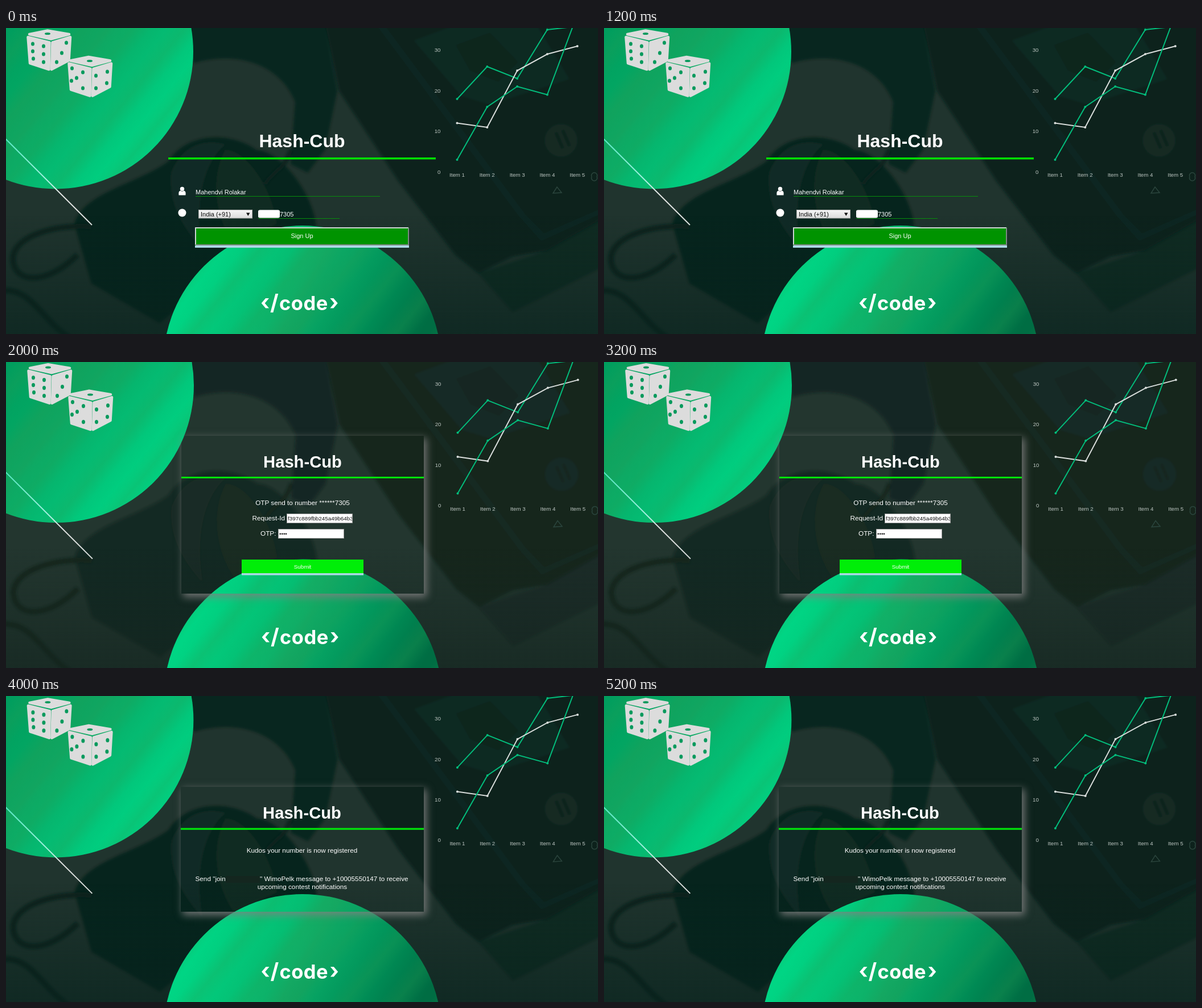
Animation, 1040 px wide and 539 px high, one loop 6000 ms. Source, as an HTML page:

```html
<!DOCTYPE html>
<html lang="en">
<head>
<meta charset="utf-8">
<title>Sign-up flow</title>
<style>
  html, body { margin: 0; width: 100%; height: 100%; overflow: hidden; background: #08231d; }
  svg, section { position: absolute; left: 0; top: 0; width: 1040px; height: 539px; }
  text { font-family: "Liberation Sans", Arial, sans-serif; fill: #fff; white-space: pre; }
  section { visibility: hidden; font-size: 11px; }
  section.small { font-size: 11.75px; }
  .mid { text-anchor: middle; }
  .title { font-size: 32px; font-weight: bold; text-anchor: middle; }
  .small .title { font-size: 29.2px; }
  .ink { fill: #111; }
  .field { font-size: 9.9px; }
  .panel { position: absolute; box-shadow: 4px 5px 13px 1px rgba(128, 128, 128, .85); }
  .code text { font-family: Inter, "Open Sans", sans-serif; font-weight: 700; }
  .axis { font-size: 9.7px; }
  .axis text { fill: #bcc5c1; }
  #backdrop { --dark: #07231d; --light: #20342e; }
  #backdrop.dim { --dark: #13251f; --light: #23362f; }
  .dark { fill: var(--dark); }
  .light { fill: var(--light); }
  .cable { fill: none; stroke: var(--dark); }
  #shade stop { stop-color: var(--dark); }
</style>
</head>
<body>
<svg id="backdrop">
  <defs>
    <linearGradient id="topGreen" gradientUnits="userSpaceOnUse" x1="-20" y1="-10" x2="230" y2="195">
      <stop offset="0" stop-color="#009a5c"/><stop offset=".3" stop-color="#02a562"/>
      <stop offset=".5" stop-color="#12a560"/><stop offset=".58" stop-color="#08ae68"/>
      <stop offset=".78" stop-color="#04bd74"/><stop offset="1" stop-color="#00d081"/>
    </linearGradient>
    <linearGradient id="lowGreen" gradientUnits="userSpaceOnUse" x1="350" y1="425" x2="680" y2="620">
      <stop offset="0" stop-color="#00d584"/><stop offset=".3" stop-color="#05bd72"/>
      <stop offset=".44" stop-color="#14a862"/><stop offset=".54" stop-color="#07a564"/>
      <stop offset=".75" stop-color="#008f57"/><stop offset="1" stop-color="#006d43"/>
    </linearGradient>
    <linearGradient id="stripes" gradientUnits="userSpaceOnUse" x1="0" y1="0" x2="27" y2="22" spreadMethod="reflect">
      <stop offset=".3" stop-color="#2a9a50" stop-opacity="0"/><stop offset="1" stop-color="#2a9a50" stop-opacity=".22"/>
    </linearGradient>
    <linearGradient id="streak" gradientUnits="userSpaceOnUse" x1="0" y1="196" x2="151" y2="347">
      <stop offset="0" stop-color="#58e8c4"/><stop offset=".5" stop-color="#a8f2e2"/>
      <stop offset=".62" stop-color="#e4e6e5"/><stop offset="1" stop-color="#d8dddb"/>
    </linearGradient>
    <linearGradient id="select" x2="0" y2="1">
      <stop stop-color="#f6f6f6"/><stop offset="1" stop-color="#dcdcdc"/>
    </linearGradient>
    <linearGradient id="shade" x2="0" y2="1">
      <stop stop-opacity="0"/><stop offset="1" stop-opacity=".65"/>
    </linearGradient>
    <filter id="soft" x="-5%" y="-5%" width="110%" height="110%"><feGaussianBlur stdDeviation="2"/></filter>
    <g id="die" fill="#dcdcdc" stroke="#dcdcdc" stroke-width="4.500" stroke-linejoin="round">
      <path d="M41 11 73 4.500 111 11 79 19.500Z"/>
      <path d="M38.500 16 76.500 25.500 75.500 73 42 62Z"/>
      <path d="M81.500 25.500 113 16 110.500 57 80 73Z"/>
    </g>
  </defs>

  <g id="scenery">
    <rect class="light" x="-9" y="-9" width="1060" height="560"/>
    <g filter="url(#soft)">
      <path class="dark" opacity=".75" d="M300-9H560L582 110 560 215 530 255 500 240 508 130C480 60 400 40 330 62Z"/>
      <path class="dark" opacity=".8" d="M120 345C135 290 230 275 285 235 320 180 400 185 440 215
        C480 215 540 290 545 350L550 400 330 470 270 520 150 450Z"/>
      <path class="light" opacity=".35" d="M290 255C310 205 350 195 385 205 350 235 330 300 345 390 310 350 285 310 290 255Z"/>
      <path class="light" opacity=".25" d="M385 215C425 215 470 290 475 345L400 380C365 330 360 260 385 215Z"/>
      <path class="dark" d="M560-9H1050V335L950 392 890 402 830 432 790 400 690 270 585 110Z"/>
      <path class="dark" opacity=".5" d="M830 432 950 392 1050 335V420L890 500Z"/>
      <path class="light" opacity=".3" d="M648-9 900 330 940 375 1050 325V316L945 362 912 328 662-9Z"/>
      <path class="light" opacity=".4" d="M716 22 800-9H930L990 90 850 135 800 120Z"/>
      <path class="dark" opacity=".6" d="M790 30 850 8 900 60 865 95 815 75Z"/>
      <circle class="light" opacity=".45" cx="975" cy="198" r="29"/>
      <path class="cable" stroke-width="5" d="M966 184 978 212M978 180 990 208"/>
      <path class="cable" stroke-width="9" d="M150 350C90 345 15 365 12 405 12 450 70 455 125 400M-5 462C45 460 60 510 110 545"/>
      <path class="cable" stroke-width="7" d="M500 215C490 250 470 250 455 275"/>
    </g>
    <rect x="-9" y="330" width="1060" height="220" fill="url(#shade)"/>
    <path fill="none" stroke="#2b453d" stroke-width="1.500" d="M961 291 968 280 976 290ZM1029 262a5 5 0 1 0 9 0 5 5 0 1 0-9 0"/>

    <g id="discs"></g>
    <path d="M-2 194 151 347" stroke="url(#streak)" stroke-width="2"/>

    <use href="#die"/>
    <use href="#die" x="72" y="46.500"/>
    <g id="pips" fill="#089a5d"></g>

    <g id="chart" fill="none" stroke-width="2"></g>
    <g id="axis" class="axis"></g>

    <g class="code">
      <text x="447" y="496" font-size="38">‹</text>
      <text x="464" y="497" font-size="38">/</text>
      <text x="480" y="497" font-size="34.500" letter-spacing=".5">code</text>
      <text x="568" y="496" font-size="38">›</text>
    </g>
  </g>
</svg>

<section>
  <svg>
    <text class="title" x="520" y="209.500">Hash-Cub</text>
    <rect x="285" y="228" width="470" height="3.500" fill="#00e000"/>
    <circle cx="309.500" cy="283.500" r="3.700" fill="#fff"/>
    <path d="M303.500 294.500Q302.500 287 306.500 286.500 309.500 289 312.500 286.500 316.500 287 315.500 294.500Z" fill="#fff"/>
    <text x="333" y="293">Mahendvi Rolakar</text>
    <path d="M333 296.500H657M443 335.500H586" stroke="#078c0c"/>
    <circle cx="309.500" cy="325.500" r="7" fill="#fff"/>
    <rect x="338.500" y="320.500" width="94" height="14.500" fill="url(#select)" stroke="#a9a9a9"/>
    <text class="ink" x="342" y="331.500">India (+91)</text>
    <path d="M422 325.500H428.500L425.250 331Z" fill="#111"/>
    <rect x="443" y="320.500" width="38" height="14" rx="3" fill="#fff"/>
    <text x="481" y="331.500">7305</text>
    <rect x="332" y="383" width="376" height="4" fill="#add8e6"/>
    <rect x="332" y="351" width="376" height="32" fill="#009300"/>
    <path d="M333 382V352H707" fill="none" stroke="#ccd6d2" stroke-width="2"/>
    <path d="M333 382H707V352" fill="none" stroke="#7d8a84" stroke-width="2"/>
    <text class="mid" x="520" y="370">Sign Up</text>
  </svg>
</section>

<section class="small">
  <div class="panel" style="left:308px;top:129.500px;width:426px;height:278.500px"></div>
  <svg>
    <text class="title" x="521" y="185.500">Hash-Cub</text>
    <rect x="308" y="202" width="426" height="3" fill="#00e60a"/>
    <text class="mid" x="521" y="252">OTP send to number ******7305</text>
    <text x="432.500" y="279">Request-Id</text>
    <text x="447" y="306">OTP:</text>
    <g fill="#fff" stroke="#9a9a9a">
      <rect x="493.500" y="267.500" width="115" height="16"/>
      <rect x="478.500" y="294.500" width="115" height="16"/>
    </g>
    <clipPath id="idClip"><rect x="494" y="267" width="114" height="17"/></clipPath>
    <text class="ink field" x="495" y="279" clip-path="url(#idClip)">f397c889fbb245a49b64b3</text>
    <text class="ink field" x="480" y="306">••••</text>
    <rect x="414" y="348" width="214" height="27.500" fill="#add8e6"/>
    <rect x="414" y="348" width="214" height="24" fill="#00ee08"/>
    <text class="mid field" x="521" y="363.500">Submit</text>
  </svg>
</section>

<section class="small">
  <div class="panel" style="left:307px;top:160px;width:427px;height:219.500px"></div>
  <svg>
    <text class="title" x="520" y="216">Hash-Cub</text>
    <rect x="307" y="232.500" width="427" height="3.200" fill="#00e60a"/>
    <text class="mid" x="520" y="275.500">Kudos your number is now registered</text>
    <text x="332.500" y="326">Send "join</text>
    <rect x="386" y="317" width="60" height="12" fill="#14261f"/>
    <text x="446" y="326">" WimoPelk message to +10005550147 to receive</text>
    <text class="mid" x="520.500" y="339.500">upcoming contest notifications</text>
  </svg>
</section>

<script>
  const $ = id => document.getElementById(id);
  const columnX = i => 792.5 + 52.8 * i;

  const disc = (x, y, r, base) => [base, 'stripes']
    .map(paint => `<circle cx="${x}" cy="${y}" r="${r}" fill="url(#${paint})"/>`).join('');
  $('discs').innerHTML = disc(87, 41.5, 242, 'topGreen') + disc(520.5, 592.4, 244.4, 'lowGreen');

  const pips = [
    [47, 28], [66, 32], [47, 41], [66, 46], [48, 54], [66, 60],
    [89, 60], [98, 44], [106, 26],
    [116, 71], [135, 78], [124, 88], [115, 93], [135, 106],
    [158, 84], [178, 77], [158, 106], [177, 97]
  ];
  $('pips').innerHTML =
    pips.map(([x, y]) => `<ellipse cx="${x}" cy="${y}" rx="3" ry="3.6"/>`).join('') +
    [[73, 10], [147, 58]].map(([x, y]) => `<ellipse cx="${x}" cy="${y}" rx="5" ry="2"/>`).join('');

  const series = [
    ['#03bd7c', [125, 68, 89, 3, -3]],
    ['#d9dddb', [167.5, 175, 75, 46, 32]],
    ['#03bd7c', [232, 139, 103, 117.5, -24]]
  ];
  $('chart').innerHTML = series.map(([color, values]) => {
    const points = values.map((y, i) => [columnX(i), y]);
    const dots = points.map(([x, y]) => `<circle cx="${x}" cy="${y}" r="2" fill="${color}"/>`);
    return `<polyline points="${points}" stroke="${color}"/>` + dots.join('');
  }).join('');

  const label = (x, y, text, anchor) => `<text x="${x}" y="${y}" text-anchor="${anchor}">${text}</text>`;
  $('axis').innerHTML =
    [0, 1, 2, 3].map(i => label(763.5, 256.5 - 71.4 * i, i * 10, 'end')).join('') +
    [0, 1, 2, 3, 4].map(i => label(columnX(i), 262, `Item ${i + 1}`, 'middle')).join('');

  const sections = document.querySelectorAll('section');
  const shifts = ['0,0', '1,-.4', '.4,.9'];

  function draw() {
    const scene = Math.floor(performance.now() / 2000) % 3;
    sections.forEach((section, i) => section.style.visibility = i === scene ? 'visible' : 'hidden');
    $('backdrop').classList.toggle('dim', scene === 1);
    $('scenery').setAttribute('transform', `translate(${shifts[scene]})`);
    requestAnimationFrame(draw);
  }
  draw();
</script>
</body>
</html>
```
